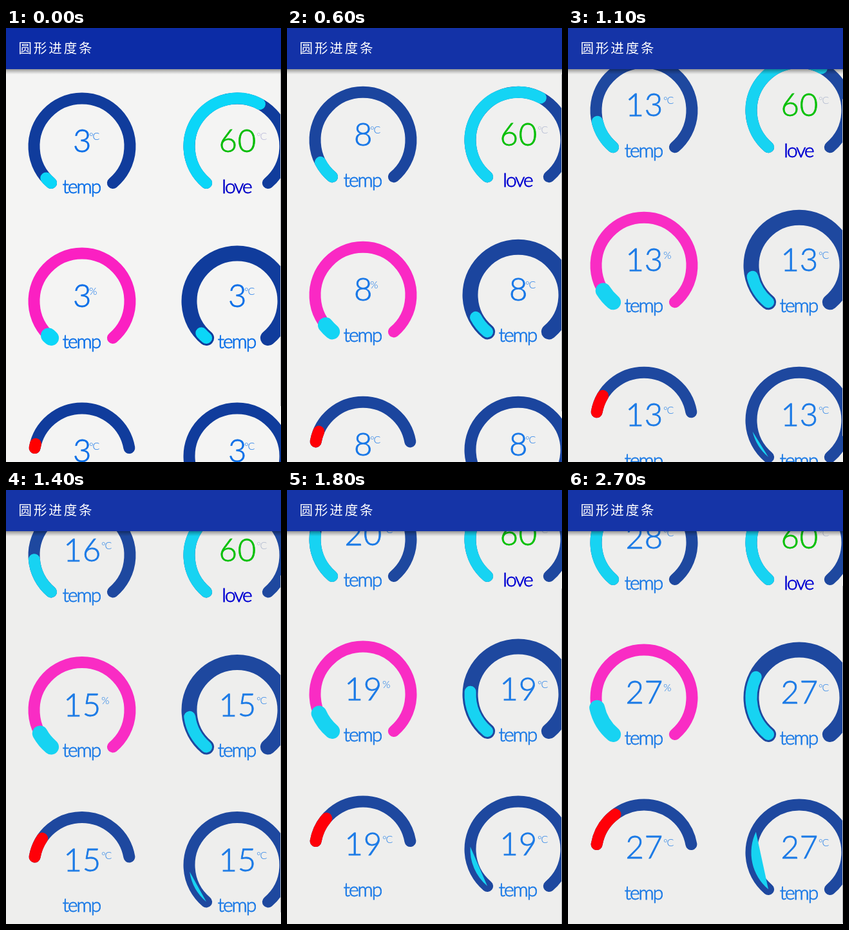
These frames come from a looping animation (427x675 px, 2.8 s). An HTML page:

```html
<!DOCTYPE html>
<html lang="zh">
<head>
<meta charset="utf-8">
<title>圆形进度条</title>
<style>
html, body { margin: 0; width: 100%; height: 100%; overflow: hidden; }
svg { display: block; width: 427px; height: 675px; }
.num { font: 300 49px Lato, sans-serif; letter-spacing: 1px; stroke-width: .8px; text-anchor: middle; }
.label { font: 300 30px Lato, sans-serif; letter-spacing: -2px; stroke-width: .8px; text-anchor: middle; }
.unit { font: 300 16px Lato, sans-serif; letter-spacing: -1px; }
.title { font: 300 20.5px "Noto Sans CJK SC", "Noto Sans CJK", sans-serif; letter-spacing: 2.9px; fill: #fff; }
</style>
</head>
<body>
<svg id="stage" viewBox="0 0 427 675">
  <defs>
    <linearGradient id="shade" x1="0" y1="0" x2="0" y2="1">
      <stop offset="0" stop-color="#000" stop-opacity=".38"/>
      <stop offset=".5" stop-color="#000" stop-opacity=".17"/>
      <stop offset="1" stop-color="#000" stop-opacity="0"/>
    </linearGradient>
  </defs>
  <rect id="page" width="427" height="675"/>
  <g id="list"></g>
  <rect id="thumb" x="426" width="1" height="524" fill="#b4b4b6"/>
  <rect y="64" width="427" height="8" fill="url(#shade)"/>
  <rect id="bar" width="427" height="64"/>
  <text class="title" x="19.5" y="38.5">圆形进度条</text>
</svg>
<script>
const LOOP = 2800, STEP = 100, R = 74.5;
const $ = id => document.getElementById(id);

// Each colour fades from its first tone to its second as the list starts to move.
const tones = {
  page: ['#f4f4f3', '#eeeeed'],
  bar: ['#0c2ca6', '#1534a7'],
  track: ['#103c9c', '#1e489f'],
  pink: ['#fb20c2', '#f92cc4'],
  cyan: ['#0bd6f8', '#17d3f2'],
  red: ['#ff0000', '#ff0008'],
  text: ['#0a6fe8', '#1b7ae6'],
  green: ['#06bd06', '#08c008'],
  navy: ['#0000c8', '#0000d2'],
  grey: ['#b2b2d6', '#aab4cc']
};

const base = {
  from: 130, sweep: 280, max: 100, start: 3.5, rate: 0.88,
  track: 'track', bar: 'cyan', trackW: 18, barW: 18,
  num: 'text', unitTone: 'text', labelTone: 'text', unit: '°C', label: 'temp'
};
const gauges = [
  { rate: 0.925, start: 3.4 },
  { start: 60, rate: 0, label: 'love', num: 'green', unitTone: 'grey', labelTone: 'navy' },
  { rate: 0.89, max: 200, track: 'pink', barW: 24, unit: '%' },
  { trackW: 24 },
  { from: 190, sweep: 160, bar: 'red' },
  { filled: true }
].map((g, i) => ({ ...base, ...g, x: 118 + i % 2 * 241, y: 184 + (i >> 1) * 241 }));

const scrollKeys = [[0, 0], [500, 0], [800, 29], [1400, 82.5], [1700, 107], [2300, 107], [2700, 102], [2800, 102]];

function add(parent, tag, attrs, text) {
  const el = document.createElementNS('http://www.w3.org/2000/svg', tag);
  for (const k in attrs) el.setAttribute(k, attrs[k]);
  if (text) el.textContent = text;
  return parent.appendChild(el);
}

function arc(g, sweep) {
  const at = deg => {
    const a = deg * Math.PI / 180;
    return (g.x + R * Math.cos(a)).toFixed(2) + ' ' + (g.y + R * Math.sin(a)).toFixed(2);
  };
  return `M${at(g.from)}A${R} ${R} 0 ${sweep > 180 ? 1 : 0} 1 ${at(g.from + sweep)}`;
}

function along(keys, t) {
  const i = Math.max(1, keys.findIndex(k => k[0] >= t));
  const [t0, a] = keys[i - 1], [t1, b] = keys[i];
  return a + (b - a) * (t - t0) / (t1 - t0);
}

function mix([a, b], k) {
  const part = (hex, i) => parseInt(hex.substr(1 + i * 2, 2), 16);
  return `rgb(${[0, 1, 2].map(i => Math.round(part(a, i) + (part(b, i) - part(a, i)) * k))})`;
}

function paint(el, colour) {
  el.setAttribute('fill', colour);
  el.setAttribute('stroke', colour);
}

for (const g of gauges) {
  const line = w => ({ fill: 'none', 'stroke-width': w, 'stroke-linecap': 'round' });
  g.trackEl = add($('list'), 'path', { ...line(g.trackW), d: arc(g, g.sweep) });
  g.barEl = add($('list'), 'path', g.filled ? {} : line(g.barW));
  g.numEl = add($('list'), 'text', { class: 'num', x: g.x + 0.8, y: g.y + 9 });
  g.unitEl = add($('list'), 'text', { class: 'unit', y: g.y - 10 }, g.unit);
  g.labelEl = add($('list'), 'text', { class: 'label', x: g.x - 1, y: g.y + 72.5 }, g.label);
}

function draw(time) {
  const t = Math.floor(time % LOOP / STEP) * STEP;
  const k = Math.min(1, Math.max(0, (t - 300) / 400));
  const tone = name => mix(tones[name], k);
  const scroll = along(scrollKeys, t);

  $('page').setAttribute('fill', tone('page'));
  $('bar').setAttribute('fill', tone('bar'));
  $('list').setAttribute('transform', `translate(0 ${-scroll})`);
  $('thumb').setAttribute('y', 64 + scroll * 0.835);

  for (const g of gauges) {
    const value = Math.floor(g.start + g.rate * t / STEP);
    g.trackEl.setAttribute('stroke', tone(g.track));
    g.barEl.setAttribute(g.filled ? 'fill' : 'stroke', tone(g.bar));
    g.barEl.setAttribute('d', arc(g, value / g.max * g.sweep));
    g.numEl.textContent = value;
    paint(g.numEl, tone(g.num));
    paint(g.labelEl, tone(g.labelTone));
    g.unitEl.setAttribute('x', g.x + (value < 10 ? 11 : 30));
    g.unitEl.setAttribute('fill', tone(g.unitTone));
  }
}

let begin;
function tick(now) {
  begin ??= now;
  draw(now - begin);
  requestAnimationFrame(tick);
}
draw(0);
requestAnimationFrame(tick);
</script>
</body>
</html>
```
